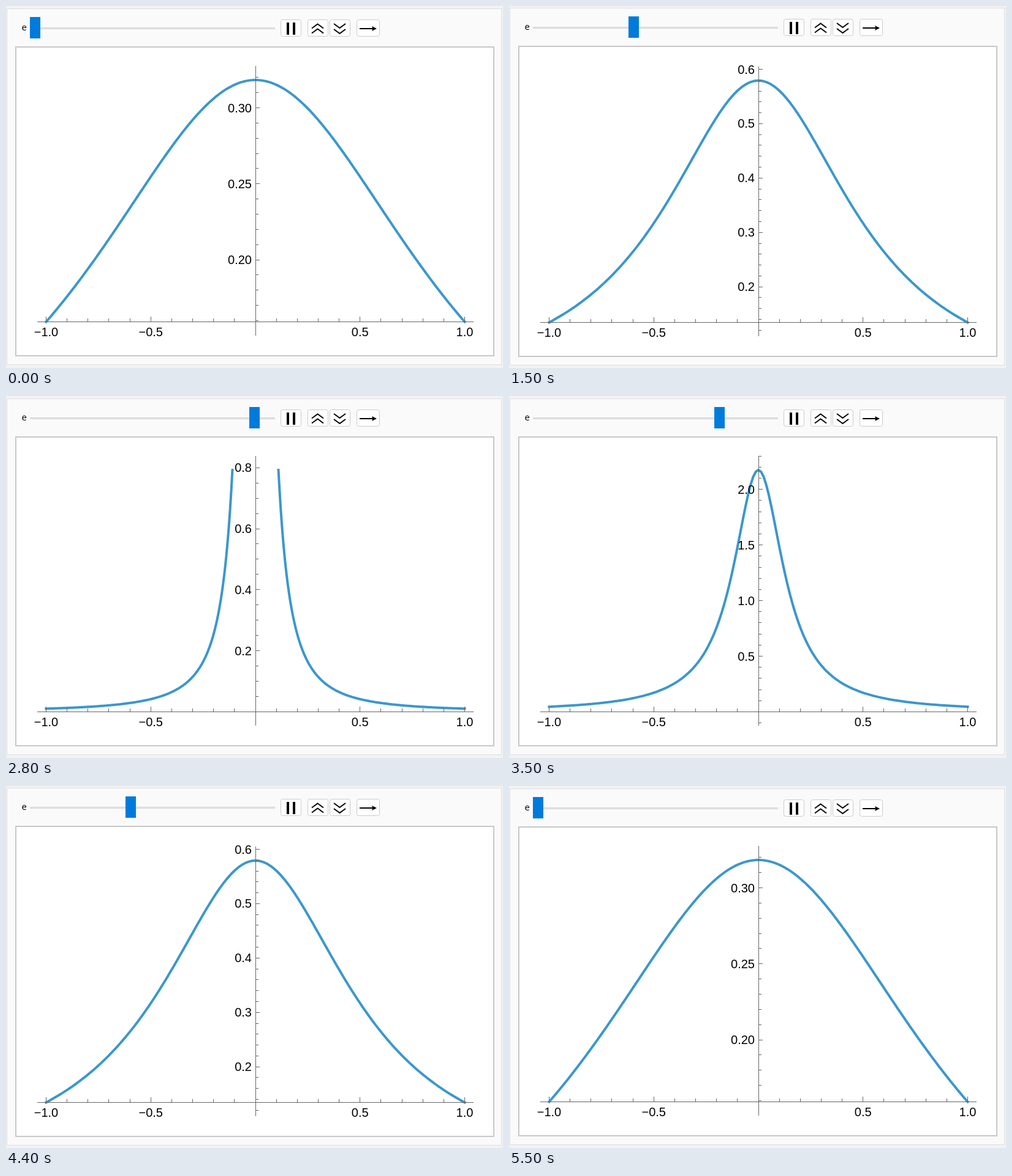
Write an HTML page that moves like this. It is 811 px wide and 592 px high and loops after 6 s.

```html
<!DOCTYPE html>
<html lang="en">
<head>
<meta charset="utf-8">
<title>Lorentzian with a width slider</title>
<style>
  html, body { margin: 0; width: 100%; height: 100%; overflow: hidden; background: #f2f2f2; }
  svg { display: block; }
  .crisp { shape-rendering: crispEdges; }
  .panel { fill: #fafafa; stroke: #dedede; }
  .frame { fill: #fff; stroke: #c8c8c8; stroke-width: 2; }
  .button { fill: #fff; stroke: #cbcbcb; }
  .icon { fill: none; stroke: #000; stroke-width: 2; }
  .axis { fill: none; stroke: #666; }
  .curve { fill: none; stroke: #3b97cd; stroke-width: 4; stroke-linecap: square; stroke-linejoin: round; }
  .label { font: 20px "Liberation Sans", Arial, sans-serif; }
  .name { font: 15px "Open Sans", "Noto Sans", sans-serif; }
</style>
</head>
<body>
<svg width="811" height="592" viewBox="0 0 811 592">
  <rect id="panel" class="panel crisp" x="1.5" width="807"/>
  <g id="controls">
    <text class="name" x="25.5" y="40">e</text>
    <rect x="39" y="35" width="400" height="3" fill="#d2d2d2"/>
    <rect x="39" y="36" width="400" height="1" fill="#ebebeb"/>
    <rect id="thumb" y="18" width="17" height="35" fill="#007bdb"/>
    <rect class="button" x="448.5" y="22.5" width="33" height="27" rx="3"/>
    <rect class="button" x="492.5" y="22.5" width="33" height="27" rx="3"/>
    <rect class="button" x="528.5" y="22.5" width="33" height="27" rx="3"/>
    <rect class="button" x="572.5" y="22.5" width="37" height="27" rx="3"/>
    <path d="M458 27h4v20h-4zM468 27h4v20h-4z"/>
    <path class="icon" d="M499 36.5l9.5-7 9.5 7M499 44.5l9.5-7 9.5 7"/>
    <path class="icon" d="M535 29l9.5 7 9.5-7M535 38l9.5 7 9.5-7"/>
    <path class="icon" d="M577 37h22"/>
    <path d="M597 33l8 4-8 4q2-4 0-8z"/>
  </g>
  <rect id="frame" class="frame" x="16" width="780"/>
  <g id="plot">
    <path id="curve" class="curve"/>
    <path id="axes" class="axis crisp"/>
    <g id="xLabels" class="label" text-anchor="middle"></g>
    <g id="yLabels" class="label" text-anchor="end"></g>
  </g>
</svg>
<script>
const LOOP = 6000, STEP = 100;
const CX = 407, UNIT = 341.5, BASE = 516.5, HEIGHT = 395.5;
const TOP = 98, BOTTOM = 538.5, CUT = 0.11;
const el = id => document.getElementById(id);
const px = x => CX + UNIT * x;
const text = (x, y, s) => `<text x="${x}" y="${y.toFixed(1)}">${s}</text>`;

el("xLabels").innerHTML = [-1, -0.5, 0.5, 1]
  .map(v => text(px(v), 540.3, v.toFixed(1).replace("-", "\u2212"))).join("");

let xAxis = "M51 516.5H763M407.5 98V539";
for (let n = -10; n <= 10; n++) {
  if (n) xAxis += `M${Math.floor(px(n / 10)) + 0.5} 516v${n % 5 ? -5 : -8}`;
}

// Width parameter: held at 1, then swept towards -0.1 and back.
function widthAt(time) {
  const s = Math.floor(time / STEP);
  if (s < 5 || s >= 55) return 1;
  return 0.9976 - 0.0448 * (s < 30 ? s - 5 : 54 - s);
}

function tickStep(span) {
  for (let unit = 0.01; ; unit *= 10) {
    for (const m of [1, 2, 5]) {
      if (span / (m * unit) <= 6.5) return { step: m * unit, parts: m === 2 ? 4 : 5 };
    }
  }
}

function draw(e) {
  const a = Math.abs(e);
  const f = x => a / Math.PI / (x * x + a * a);
  const clipped = f(0) > 1.9 * f(CUT);
  const max = clipped ? f(CUT) : f(0);
  let min = f(1);
  if (min < 0.25 * (max - min)) min = 0;
  const range = max - min;
  const py = v => BASE - HEIGHT * (v - min) / range;

  const line = (from, to) => {
    let d = "";
    for (let i = 0; i <= 160; i++) {
      const x = from + (to - from) * i / 160;
      d += (i ? "L" : "M") + px(x).toFixed(2) + " " + py(f(x)).toFixed(2);
    }
    return d;
  };
  el("curve").setAttribute("d", clipped ? line(-1, -CUT) + line(CUT, 1) : line(-1, 1));

  const { step, parts } = tickStep(range * 1.114);
  const minor = step / parts, digits = step < 0.09 ? 2 : 1;
  let axes = xAxis, labels = "", over = 0, under = 0;
  for (let n = Math.floor((min - range * 0.07) / minor); ; n++) {
    const v = n * minor, y = py(v);
    if (y < TOP) break;
    if (y > BOTTOM) continue;
    const major = n % parts === 0;
    axes += `M407 ${Math.floor(y) + 0.5}h${major ? 7 : 5}`;
    if (major && Math.abs(y - BASE) > 10) {
      labels += text(401, y + 7, v.toFixed(digits));
      over = Math.max(over, TOP + 7 - y);
      under = Math.max(under, y - 533);
    }
  }
  el("axes").setAttribute("d", axes);
  el("yLabels").innerHTML = labels;

  // Labels past the axis ends make the panel slightly taller.
  const grow = Math.floor(0.6 * Math.max(over, under));
  const size = (id, y, h) => {
    el(id).setAttribute("y", y - grow);
    el(id).setAttribute("height", h + 2 * grow);
  };
  size("panel", 4.5, 582);
  size("frame", 67, 505);
  el("controls").setAttribute("transform", `translate(0 ${-grow})`);
  el("plot").setAttribute("transform", `translate(0 ${over > under ? grow : -grow})`);
  el("thumb").setAttribute("x", 39 + Math.floor((1 - e) * 347));
}

let shown;
function tick() {
  const e = widthAt(performance.now() % LOOP);
  if (e !== shown) draw(shown = e);
  requestAnimationFrame(tick);
}
tick();
</script>
</body>
</html>
```
